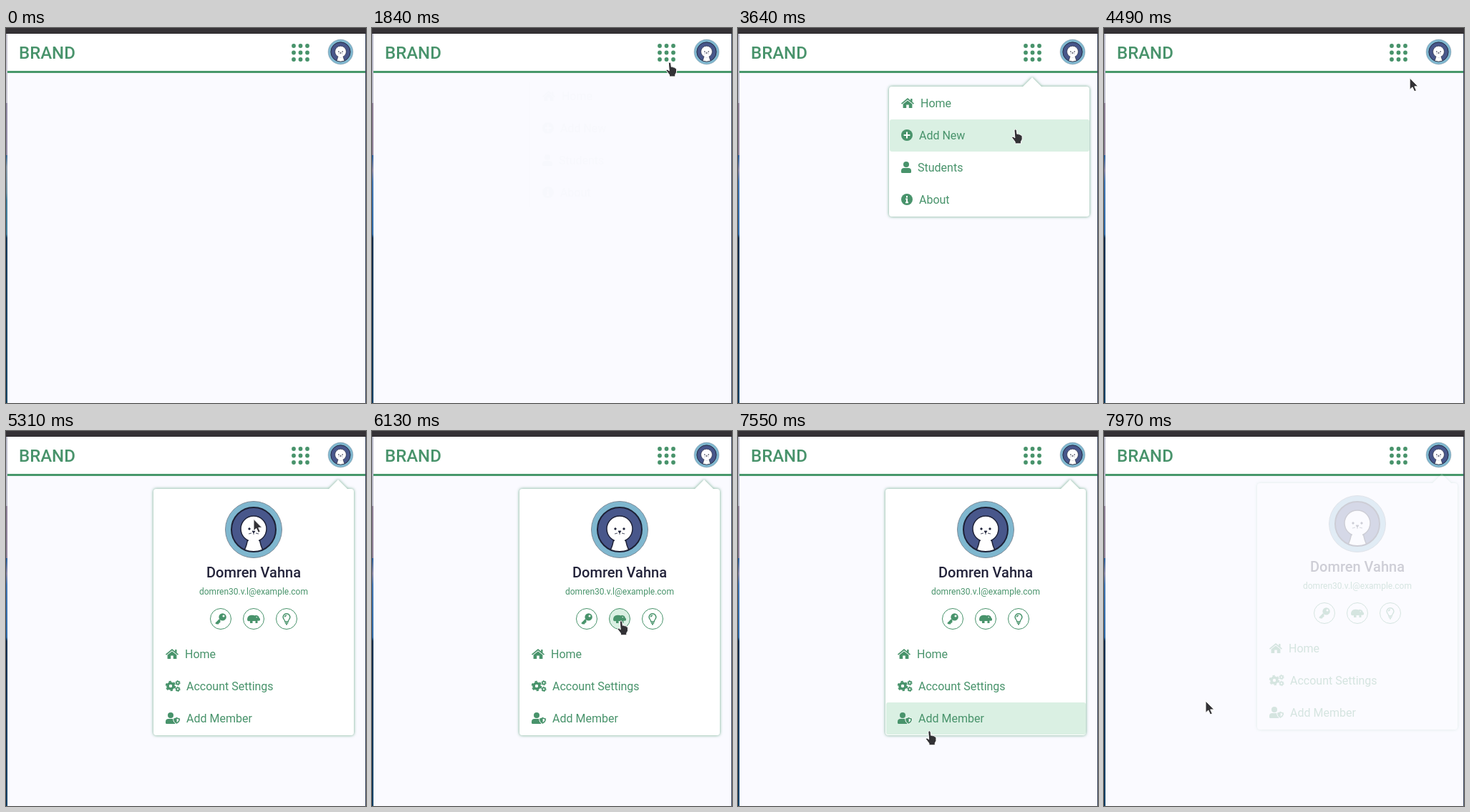
Write an HTML page that moves like this. It is 503 px wide and 525 px high and loops after 8 s.

```html
<!DOCTYPE html>
<html lang="en">
<head>
<meta charset="utf-8">
<title>Dropdown menus</title>
<style>
  html, body { margin: 0; width: 100%; height: 100%; overflow: hidden; background: #fafaff; }
  svg { display: block; }
  text { font: 400 16px Roboto, sans-serif; fill: #48936b; }
  .brand { font-size: 24px; font-weight: 500; }
  .name { font-size: 20px; font-weight: 500; fill: #23233a; text-anchor: middle; }
  .mail { font-size: 12px; text-anchor: middle; }
  .green { fill: #48936b; }
  .line { fill: none; stroke: #48936b; }
  .white { fill: none; stroke: #fff; stroke-width: 2; }
  .panel { fill: #fff; filter: drop-shadow(0 0 2px #48936bcc); }
  .cursor { fill: #333236; stroke: #fff; stroke-width: 1; stroke-linejoin: round; }
</style>
</head>
<body>
<svg width="503" height="525" viewBox="0 0 503 525">
  <defs>
    <linearGradient id="edgeA" x2="0" y2="1">
      <stop offset=".2" stop-color="#c5c3cf"/><stop offset=".2" stop-color="#948da6"/>
      <stop offset=".34" stop-color="#948da6"/><stop offset=".34" stop-color="#3f6f9a"/>
      <stop offset=".37" stop-color="#8b9bab"/><stop offset=".44" stop-color="#6f93a5"/>
      <stop offset=".46" stop-color="#437f9d"/><stop offset=".55" stop-color="#437f9d"/>
      <stop offset=".56" stop-color="#123a5c"/><stop offset="1" stop-color="#174666"/>
    </linearGradient>
    <linearGradient id="edgeB" x2="0" y2="1">
      <stop offset=".2" stop-color="#b9bac8"/><stop offset=".2" stop-color="#8f8299"/>
      <stop offset=".34" stop-color="#8f8299"/><stop offset=".34" stop-color="#2d62a0"/>
      <stop offset=".38" stop-color="#8a87a6"/><stop offset=".41" stop-color="#4377b4"/>
      <stop offset=".55" stop-color="#2f6aa8"/><stop offset=".56" stop-color="#0b2f50"/>
      <stop offset="1" stop-color="#0c4166"/>
    </linearGradient>
    <clipPath id="porthole"><circle r="31"/></clipPath>

    <g id="avatar">
      <circle r="39.5" fill="#7fb7cf" stroke="#7d8b98"/>
      <circle r="31" fill="#48578b"/>
      <g clip-path="url(#porthole)" fill="#fff" stroke="#20243a" stroke-width="1.5">
        <path d="M-8 13Q-10 24-15 34H15Q10 24 8 13Z"/>
        <circle cy="-1" r="18"/>
        <path d="M-7 14H7V18H-7Z" stroke="none"/>
      </g>
      <circle r="31" fill="none" stroke="#1d2136" stroke-width="2"/>
      <g fill="#20243a" stroke="#20243a">
        <circle cx="-6" cy="-1" r="1.2"/><circle cx="6" cy="-1" r="1.2"/>
        <path d="M-2 2H2L0 5ZM0 5V7M-3 5L-7 6M3 5L7 6" stroke-width=".8"/>
      </g>
    </g>

    <g id="home" class="green">
      <path d="M9 1 0 8.6l1 1.2L9 3.2l8 6.6 1-1.2-2.5-2.1V2h-2.3v2.6ZM2.6 9.6V15h4.6v-4.5h3.6V15h4.6V9.6L9 4.4Z"/>
    </g>
    <g id="plus"><circle cx="8" cy="8" r="8" class="green"/><path d="M8 3.6v8.8M3.6 8h8.8" class="white" stroke-width="2.4"/></g>
    <g id="info"><circle cx="8" cy="8" r="8" class="green"/><path d="M8 3v2.4M6.2 7.5H8V12M6 12.2h4" class="white"/></g>
    <g id="user" class="green"><circle cx="7" cy="4" r="4"/><path d="M0 14.5V13q0-4 4-4h6q4 0 4 4v1.5q0 1.5-1.5 1.5h-11Q0 16 0 14.5Z"/></g>
    <g id="cogs" class="line">
      <circle cx="7" cy="8" r="4" stroke-width="3.6"/>
      <circle cx="7" cy="8" r="6.3" stroke-width="2" stroke-dasharray="3.3 3.3"/>
      <g id="cog"><circle cx="17" cy="3.6" r="2" stroke-width="1.7"/><circle cx="17" cy="3.6" r="3.2" stroke-width="1" stroke-dasharray="1.7 1.65"/></g>
      <use href="#cog" y="8.8"/>
    </g>
    <g id="shield">
      <use href="#user"/>
      <path d="M15.5 6.5 20.5 8.3Q21 13.8 15.5 16.3 10.3 13.8 10.7 8.3Z" class="green" stroke="#fff"/>
      <path d="M15.6 8.8v5.2q2.9-1.6 2.9-4.3Z" fill="#fff"/>
    </g>
    <g id="key">
      <path d="M7 9 1.2 14.8M3 13l2 2M5 11l2 2" class="line" stroke-width="2.6"/>
      <circle cx="10.6" cy="5.4" r="5.2" class="green"/><circle cx="12" cy="4" r="1.5" fill="#fff"/>
    </g>
    <g id="hippo">
      <path d="M-1 9Q-1 3 5 2.7q3-.2 5 .8 1-1.5 2.3-.3 3 .4 3.3 3 2 1 1.4 3.5Q16.600 11 13.500 10.500V14h-3v-3H6.500v3h-3.500v-3Q-1 12-1 9Z" class="green"/>
      <circle cx="12.200" cy="5.700" r=".7" fill="#fff"/>
    </g>
    <g id="bulb" class="line" stroke-width="1.4">
      <path d="M5.800 12Q5.800 10.300 4.300 8.600C1.500 5 4.300.7 8 .7s6.500 4.300 3.700 7.900Q10.200 10.300 10.200 12ZM5.800 14h4.400M7 15.700h2M5.500 5.500Q5.800 3.300 8 3.200"/>
    </g>
  </defs>

  <rect width="503" height="525" fill="#fafaff"/>
  <rect id="edge" width="2" height="525"/>
  <rect x="502" y="8" width="1" height="525" fill="#3b4660"/>
  <rect width="503" height="8" fill="#353236"/>
  <rect y="7" width="503" height="1" fill="#262428"/>
  <rect x="2" y="8" width="500" height="52" fill="#fff"/>
  <rect x="2" y="60" width="500" height="3" fill="#48986b"/>
  <text class="brand" x="18" y="43">BRAND</text>
  <g id="dots" class="green"></g>
  <use href="#avatar" transform="translate(467.5 33.500) scale(.44)"/>

  <g id="nav">
    <path class="panel" d="M215 82H398L411 69 424 82H487q4 0 4 4V260q0 4-4 4H215q-4 0-4-4V86q0-4 4-4Z"/>
  </g>

  <g id="profile">
    <path class="panel" d="M210 81H451L464 68 477 81H482q4 0 4 4V422q0 4-4 4H210q-4 0-4-4V85q0-4 4-4Z"/>
    <use href="#avatar" x="346" y="138"/>
    <text class="name" x="346" y="205">Domren Vahna</text>
    <text class="mail" x="346" y="229">domren30.v.l@example.com</text>
  </g>

  <path id="arrow" class="cursor" d="M0 0V16.500L3.800 13 6.500 19 9.300 17.700 6.700 12H11.800Z"/>
  <path id="hand" class="cursor" d="M-1.700 1Q0-1.200 1.600 1L2.300 6.500Q4 5.500 4.800 7 6.500 6.200 7.300 8 9.300 7.700 9.500 10V14L7.800 17V20H-.5V17.500L-5 11.500Q-4.500 9.300-2.500 10.500L-.800 12Z"/>
</svg>

<script>
const LOOP = 8000, FADE = 300, HOVER_LAG = 30;
const $ = id => document.getElementById(id);

function add(parent, tag, attrs, text = '') {
  const el = document.createElementNS('http://www.w3.org/2000/svg', tag);
  for (const key in attrs) el.setAttribute(key, attrs[key]);
  el.textContent = text;
  parent.append(el);
  return el;
}

for (let i = 0; i < 9; i++)
  add($('dots'), 'circle', { cx: 402 + i % 3 * 9.5, cy: 25 + (i / 3 | 0) * 9.5, r: 2.9 });

const menus = [
  { el: $('nav'), open: 1840, close: 4120 },
  { el: $('profile'), open: 4750, close: 7820 },
];
const targets = [];   // hoverable shapes with their hit boxes

function addRow(menu, x, y, icon, label, textX) {
  const el = add(menu.el, 'rect', { x, y, width: 279, height: 45, rx: 3, fill: '#daf0e3' });
  add(menu.el, 'use', { href: '#' + icon, x: x + 16, y: y + 14 });
  add(menu.el, 'text', { x: textX, y: y + 28 }, label);
  targets.push({ el, menu, x, y, w: 279, h: 45 });
}

function addButton(menu, cx, cy, icon) {
  const el = add(menu.el, 'circle', { cx, cy, r: 14.500, fill: '#daf0e3' });
  add(menu.el, 'circle', { cx, cy, r: 14.500, class: 'line' });
  add(menu.el, 'use', { href: '#' + icon, x: cx - 8, y: cy - 8 });
  targets.push({ el, menu, x: cx - 15, y: cy - 15, w: 30, h: 30 });
}

const [nav, profile] = menus;
[['home', 'Home', 255], ['plus', 'Add New', 253], ['user', 'Students', 251], ['info', 'About', 253]]
  .forEach(([icon, label, x], i) => addRow(nav, 212, 83 + i * 45, icon, label, x));
['key', 'hippo', 'bulb'].forEach((icon, i) => addButton(profile, 300 + i * 46, 263, icon));
[['home', 'Home', 250], ['cogs', 'Account Settings', 252], ['shield', 'Add Member', 252]]
  .forEach(([icon, label, x], i) => addRow(profile, 207, 290 + i * 45, icon, label, x));

// Pointer path: time, x, y
const path = [
  [0, 428, 540], [490, 428, 530], [750, 431, 320], [950, 433, 215], [1100, 433, 165],
  [1200, 428, 95], [1300, 419, 54], [1350, 419, 54], [1500, 416, 48], [2150, 416, 48],
  [2400, 402, 92], [2640, 385, 118], [2760, 372, 150], [2940, 361, 198], [3270, 371, 265],
  [3460, 371, 265], [3710, 394, 95], [3920, 394, 95], [4030, 210, 118], [4110, 95, 130],
  [4200, 95, 130], [4490, 427, 70], [4720, 464, 38], [4900, 464, 38], [5310, 346, 123],
  [5560, 348, 210], [5720, 302, 257], [5900, 304, 262], [6080, 342, 264], [6360, 375, 274],
  [6470, 389, 266], [6640, 324, 268], [6780, 288, 310], [6900, 276, 340], [7170, 274, 384],
  [7250, 274, 384], [7390, 268, 420], [7550, 268, 420], [7780, 142, 378], [8000, 142, 378],
];

function pointerAt(t) {
  const i = Math.max(1, path.findIndex(p => p[0] >= t));
  const [t0, x0, y0] = path[i - 1], [t1, x1, y1] = path[i];
  const k = (t - t0) / (t1 - t0);
  return [x0 + (x1 - x0) * k, y0 + (y1 - y0) * k];
}

const ease = x => 1 - (1 - Math.min(1, Math.max(0, x))) ** 2.3;
const shown = (menu, t) => ease((t - menu.open) / FADE) - ease((t - menu.close) / FADE);
const inside = ([px, py], { x, y, w, h }) => px >= x && px < x + w && py >= y && py < y + h;
const headerLinks = [{ x: 396, y: 18, w: 34, h: 36 }, { x: 450, y: 16, w: 35, h: 35 }];

function draw(t) {
  $('edge').setAttribute('fill', `url(#edge${t < 1350 ? 'A' : 'B'})`);
  for (const menu of menus) {
    const k = shown(menu, t);
    menu.el.style.opacity = k;
    menu.el.setAttribute('transform', `translate(${10 - 10 * k} ${10 * k - 10})`);
  }

  const point = pointerAt(t), lagged = pointerAt(Math.max(0, t - HOVER_LAG));
  const active = ({ menu }) => t > menu.open && t < menu.close;
  for (const target of targets)
    target.el.style.opacity = +(active(target) && inside(lagged, target));

  const link = headerLinks.some(box => inside(point, box)) ||
    targets.some(target => active(target) && inside(point, target));
  for (const id of ['arrow', 'hand']) {
    $(id).setAttribute('transform', `translate(${point})`);
    $(id).style.display = (id === 'hand') === link ? '' : 'none';
  }
}

const start = performance.now();
function tick() {
  draw((performance.now() - start) % LOOP);
  requestAnimationFrame(tick);
}
tick();
</script>
</body>
</html>
```
